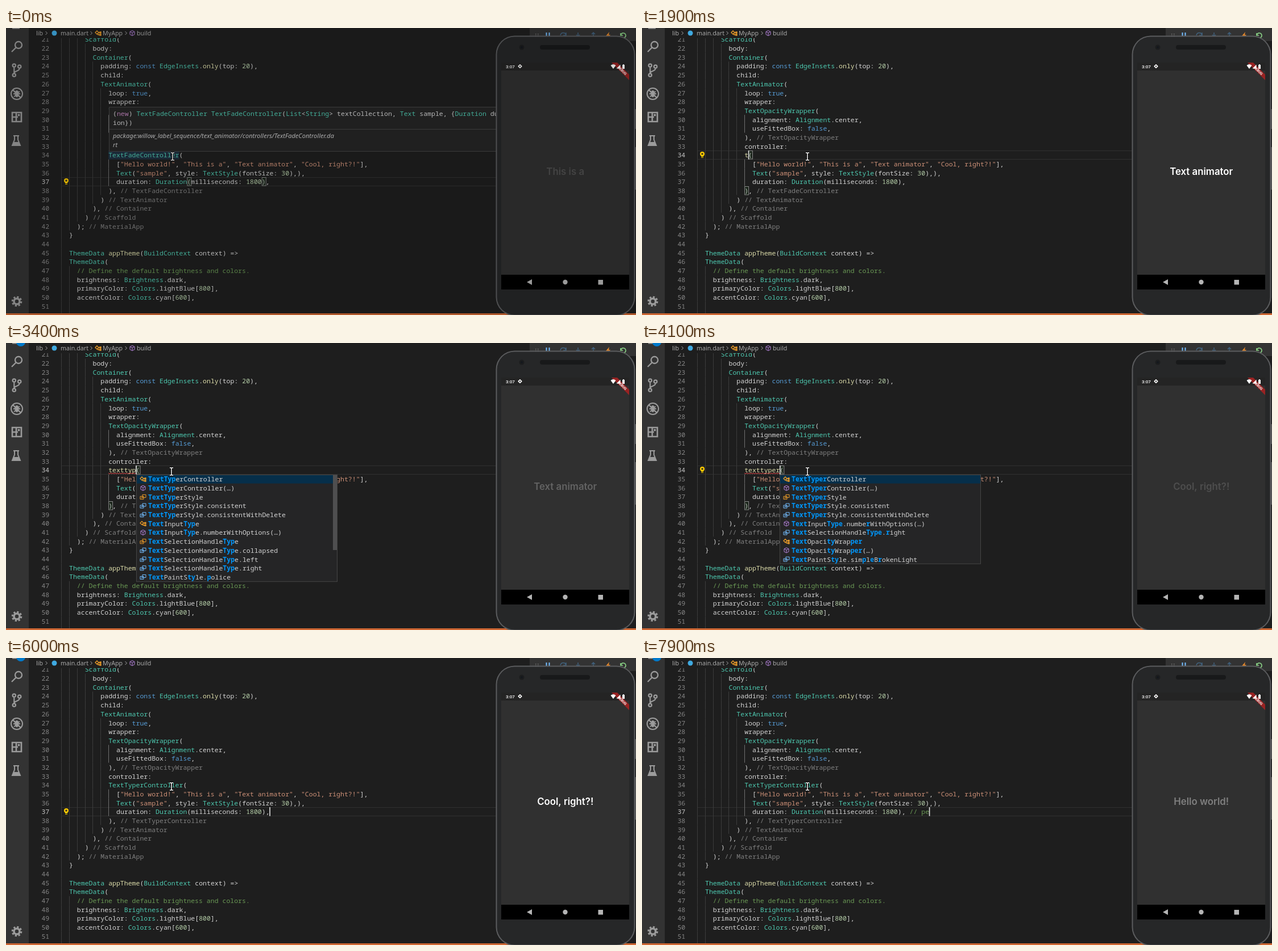
Animation of 1108 by 506 pixels, one loop 8 s. Source, as an HTML page with a canvas:

```html
<!DOCTYPE html>
<html lang="en">
<head>
<meta charset="utf-8">
<title>Code editor beside a phone</title>
<style>
html, body { margin: 0; width: 1108px; height: 506px; overflow: hidden; background: #1e1e1e; }
canvas { display: block; }
</style>
</head>
<body>
<canvas id="stage" width="1108" height="506"></canvas>
<script>
const ctx = document.getElementById('stage').getContext('2d');
const LOOP = 8000, FIRST = 21, ROW = 15.68, X0 = 111, CHAR = 6.914;
const MONO = '11.523px "Noto Sans Mono", monospace';
const UI = '10.7px "Noto Sans", sans-serif';
const GREY = '#9b9b9b', ORANGE = '#ee9d28', PURPLE = '#b180d7', BLUE = '#75beff';

const source = `    Scaffold(
      body:
      Container(
        padding: const EdgeInsets.only(top: 20),
        child:
        TextAnimator(
          loop: true,
          wrapper:
          TextOpacityWrapper(
            alignment: Alignment.center,
            useFittedBox: false,
          ), // TextOpacityWrapper
          controller:
          HEAD(
            ["Hello world!", "This is a", "Text animator", "Cool, right?!"],
            Text("sample", style: TextStyle(fontSize: 30),),
            duration: Duration(milliseconds: 1800),
          ), // LABEL
        ) // TextAnimator
      ), // Container
    ) // Scaffold
  ); // MaterialApp
}

ThemeData appTheme(BuildContext context) =>
ThemeData(
  // Define the default brightness and colors.
  brightness: Brightness.dark,
  primaryColor: Colors.lightBlue[800],
  accentColor: Colors.cyan[600],
  
  // Define the default font family.`.split('\n');

const refreshes = [[300, 300], [500, 700], [900, 900], [1100, 1200], [1400, 1400], [1600, 2500],
  [3400, 3500], [3700, 3800], [4100, 4100], [4400, 4400], [4600, 4800], [5000, 5300], [5500, 6000],
  [6200, 6400], [6600, 6700], [6900, 7000], [7200, 7200], [7400, 7400], [7700, 7900]];
function hold(t) {
  let held = 0;
  for (const [from, to] of refreshes) if (t >= from) held = Math.min(to, Math.floor(t / 100) * 100);
  return held;
}

// Last value whose start time has passed: at(t, 0, a, 500, b, ...)
function at(t, ...steps) {
  let value;
  for (let i = 0; i < steps.length; i += 2) if (t >= steps[i]) value = steps[i + 1];
  return value;
}

const rowY = line => 263 + (line - 37) * ROW;
const colX = col => X0 + col * CHAR;

function rect(x, y, w, h, color) {
  ctx.fillStyle = color;
  ctx.fillRect(x, y, w, h);
}
function frame(x, y, w, h, color) {
  ctx.strokeStyle = color;
  ctx.lineWidth = 1;
  ctx.strokeRect(x, y, w, h);
}
function round(x, y, w, h, r, fill) {
  ctx.beginPath();
  ctx.roundRect(x, y, w, h, r);
  ctx.fillStyle = fill;
  ctx.fill();
}
function dot(x, y, r, color) {
  round(x - r, y - r, 2 * r, 2 * r, r, color);
}
function text(s, x, y, font, color, align = 'left') {
  ctx.font = font;
  ctx.fillStyle = color;
  ctx.textAlign = align;
  ctx.fillText(s, x, y);
}
function icon(x, y, path, color, width = 1, filled) {
  ctx.save();
  ctx.translate(x, y);
  ctx.lineWidth = width;
  ctx.strokeStyle = ctx.fillStyle = color;
  ctx[filled ? 'fill' : 'stroke'](new Path2D(path));
  ctx.restore();
}

const ENUM = 'M-1-4H5V1H-1ZM-5-1H1V4H-5ZM-3.5 1.5h3';
const symbols = {
  C: ['M-5-1L-2-4L1-1L-2 2ZM1-1H4M0 0V3H3M3-2h2v2h-2zM3 2h2v2h-2z', ORANGE, 1.3],
  M: ['M0-4.5L4-2.5V2.5L0 4.5L-4 2.5V-2.5ZM-4-2.5L0-.5L4-2.5M0-.5V4.5', PURPLE],
  E: [ENUM, ORANGE],
  m: [ENUM, BLUE]
};

const tokens = /(\/\/.*)|("[^"]*")|\b(const|true|false)\b|\b(new)\b|(\d+)|([A-Z]\w*)|([a-z]\w*(?=\())|\w+|[^\s\w]/g;
const tokenColors = ['#6a9955', '#ce9178', '#569cd6', '#c586c0', '#b5cea8', '#4ec9b0', '#dcdcaa'];
function code(s, x, y) {
  const closing = /^\s*\)/.test(s);
  for (const m of s.matchAll(tokens)) {
    const kind = m.slice(1).findIndex(Boolean);
    const color = kind < 0 ? '#d4d4d4' : kind === 0 && closing ? '#7f7f7f' : tokenColors[kind];
    text(m[0], x + m.index * CHAR, y, MONO, color);
  }
}

function bracket(line, col) {
  rect(colX(col), rowY(line), CHAR, ROW, 'rgba(0,100,0,.1)');
  frame(colX(col) + .5, Math.round(rowY(line)) + .5, CHAR, 14.5, '#888');
}

function bulb(line) {
  const y = rowY(line) + 6;
  dot(106, y, 4, '#fc0');
  rect(104, y + 3, 4, 4, '#fc0');
  dot(106, y, 1.8, '#3a3518');
  rect(104, y + 5, 4, 1, '#1e1e1e');
}

function squiggle(x, y, w) {
  ctx.beginPath();
  for (let i = 0; i <= w; i += 2) ctx.lineTo(x + i, y + (i % 4 ? 1 : -1));
  ctx.strokeStyle = '#f14c4c';
  ctx.lineWidth = 1;
  ctx.stroke();
}

function editor(t, s) {
  const lines = source.map(l => l.replace('HEAD', s.head).replace('LABEL', s.label));
  lines[16] += s.tail;
  const y = Math.round(rowY(s.line));
  if (!s.selected) {
    rect(98, y, 770, 1, '#303030');
    rect(98, y + 15, 770, 1, '#303030');
  }
  lines.forEach((line, i) => {
    const n = FIRST + i, indent = line.search(/\S|$/);
    for (let col = -2; col < (line ? indent : 0); col += 2)
      rect(Math.round(colX(col)), rowY(n), 1, ROW, col === 10 ? '#707070' : '#3c3c3c');
    text(n < 52 ? n : '', 76.2, rowY(n) + 12.3, MONO, n === s.line ? '#c6c6c6' : '#858585', 'right');
  });
  if (s.selected) rect(colX(10), rowY(34), 18 * CHAR, ROW, '#2a5a88');
  if (s.hover) rect(colX(10), rowY(34), s.head.length * CHAR, ROW, '#203040');
  lines.forEach((line, i) => code(line, X0, rowY(FIRST + i) + 12.3));
  if (t < 500) { bracket(37, 30); bracket(37, 49); }
  if (t >= 1700 && t < 5300) { bracket(34, 10 + s.head.length); bracket(38, 10); }
  if (t >= 3400 && t < 4600) squiggle(colX(10), 230, s.head.length * CHAR);
  if (s.caret) rect(colX(s.col) - .3, rowY(s.line), 1.6, ROW, '#e0e0e0');
  if (s.bulb) bulb(s.bulb);
}

// Hover card whose bottom edge rests on line 34.
function hoverCard(lines, path) {
  const h = 46.6 + lines.length * ROW, y = 217 - h;
  rect(181, y, 700, h, '#252526');
  frame(181.5, Math.round(y) + .5, 700, h, '#454545');
  lines.forEach((l, i) => code(l, 188, y + 16 + i * ROW));
  rect(182, 178, 700, 1, '#454545');
  const font = 'italic ' + UI.replace('10.7', '11');
  text(path, 188, 194, font, '#ccc');
  text('rt', 188, 209.7, font, '#ccc');
}

const lists = {
  tex: ['C *Tex*t', 'M *Tex*t(…)', 'C *Tex*tStyle', 'M *Tex*tStyle(…)', 'E *Tex*tAlign', 'm *Tex*tAlign.center',
    'm *Tex*tAlign.left', 'm *Tex*tAlign.right', 'C *Tex*tAnimator', 'M *Tex*tAnimator(…)', 'C *Tex*tField', 'M *Tex*tField(…)'],
  texttyp: ['C *TextTyp*erController', 'M *TextTyp*erController(…)', 'E *TextTyp*erStyle',
    'm *TextTyp*erStyle.consistent', 'm *TextTyp*erStyle.consistentWithDelete', 'C *Text*Input*Typ*e',
    'M *Text*Input*Typ*e.numberWithOptions(…)', 'E *Text*SelectionHandle*Typ*e',
    'm *Text*SelectionHandle*Typ*e.collapsed', 'm *Text*SelectionHandle*Typ*e.left',
    'm *Text*SelectionHandle*Typ*e.right', 'm *Text*PaintS*ty*le.*p*olice'],
  texttyper: ['C *TextTyper*Controller', 'M *TextTyper*Controller(…)', 'E *TextTyper*Style',
    'm *TextTyper*Style.consistent', 'm *TextTyper*Style.consistentWithDelete',
    'M *Text*Input*Type*.numbe*r*WithOptions(…)', 'm *Text*SelectionHandle*Type*.*r*ight',
    'C *Text*Opaci*ty*Wrap*per*', 'M *Text*Opaci*ty*Wrap*per*(…)', 'm *Text*PaintS*ty*le.sim*p*l*e*B*r*okenLight']
};

function suggestions(key) {
  const items = lists[key], x = Math.round(colX(10 + key.length)) + 1, y = 232;
  const h = items.length * ROW;
  rect(x, y, 353, h, '#252526');
  rect(x, y, 353, ROW, '#062f4a');
  items.forEach((item, i) => {
    const mid = y + 8 + i * ROW;
    icon(x + 11, mid, ...symbols[item[0]]);
    let pen = x + 20;
    item.slice(2).split('*').forEach((part, j) => {
      text(part, pen, mid + 4.4, (j % 2 ? 'bold ' : '') + MONO, j % 2 ? '#0097fb' : '#d4d4d4');
      pen += part.length * CHAR;
    });
  });
  if (items.length > 10) rect(x + 345, y + 1, 8, 132, '#4f4f50');
  frame(x - .5, y + .5, 353, h, '#454545');
}

function breadcrumbs() {
  rect(40, 0, 1068, 18, '#1e1e1e');
  for (const [label, x] of [['lib', 53], ['main.dart', 96], ['MyApp', 170], ['build', 230]])
    text(label, x, 12.8, UI, '#a9a9a9');
  for (const x of [71, 150, 211]) icon(x, 9, 'M-1.5-3L1.5 0L-1.5 3', '#a9a9a9');
  dot(85, 9, 4.5, '#3fa9e0');
  icon(162, 9, ...symbols.C);
  icon(222, 9, ...symbols.M);
}

function activityBar(badge) {
  rect(0, 0, 40, 506, '#333');
  rect(11, 0, 13, 1.5, GREY);
  if (badge) dot(26, -2, 8, '#007acc');
  icon(22, 30, 'M6 0A6 6 0 1 1-6 0A6 6 0 1 1 6 0M-4 4L-12 12', GREY, 2.3);
  icon(19, 74, 'M-2-8A2.7 2.7 0 1 1-7.4-8A2.7 2.7 0 1 1-2-8M7.4-6A2.7 2.7 0 1 1 2-6A2.7 2.7 0 1 1 7.4-6' +
    'M-2 9A2.7 2.7 0 1 1-7.4 9A2.7 2.7 0 1 1-2 9M-4.7-5V6M4.7-3C4.7 3-4.7 1-4.7 6', GREY, 2.2);
  icon(19, 116, 'M10 0A10 10 0 1 1-10 0A10 10 0 1 1 10 0M-7-7L7 7M-6 0H6M-5-4L-2-2M5-4L2-2M-5 5L-2 3M5 5L2 3', GREY, 2);
  icon(19, 116, 'M0-6C5-6 4 6 0 6C-4 6-5-6 0-6', GREY, 1, true);
  icon(19, 157, 'M-8-8H8V8H-8ZM-8 0H2M-1-8V8M3-4h1v1h-1z', GREY, 2.6);
  icon(18, 199, 'M-5-9H5M-3-9V-2L-7 8H7L3-2V-9', GREY, 2);
  icon(18, 199, 'M-4 2H4L7 8H-7Z', GREY, 1, true);
  const ring = r => `M${r} 0A${r} ${r} 0 1 1-${r} 0A${r} ${r} 0 1 1 ${r} 0`;
  icon(19, 482, ring(5), GREY, 3.6);
  ctx.setLineDash([3.2, 2.92]);
  icon(19, 482, ring(7.8), GREY, 3);
  ctx.setLineDash([]);
}

function debugBar() {
  rect(921, 0, 187, 23, '#333');
  for (let i = 0; i < 6; i++) rect(931 + i % 2 * 4, 10 + (i >> 1) * 3, 1.5, 1.5, '#777');
  icon(953, 13, 'M-2.5-5V5M2.5-5V5', BLUE, 2);
  icon(980, 13, 'M-5 0C-4-6 4-6 5 0M5-5V0H0', '#40627f', 1.5);
  icon(1006, 13, 'M0-5V2M-3-1L0 2L3-1', '#40627f', 1.5);
  icon(1033, 13, 'M0 2V-5M-3-2L0-5L3-2', '#40627f', 1.5);
  icon(1059, 13, 'M2-6L-4 1H-1L-2 6L4-1H1Z', '#e8892b', 1, true);
  icon(1085, 13, 'M-4-4V0H0M-4 0C-2-6 5-5 5 1C4 4 2 5 0 5', '#89d185', 1.7);
}

const messages = ['This is a', 'Text animator', 'Cool, right?!', 'Hello world!'];
function phone(t) {
  rect(1104, 143, 4, 35, '#555');
  rect(1104, 210, 4, 75, '#555');
  round(861.5, 13.5, 245, 494, 33, '#5b5c5e');
  round(863.5, 15.5, 241, 490, 31, '#262728');
  round(939, 30, 88, 8, 4, '#18191a');
  dot(907, 34, 4.5, '#1c1d1e');
  dot(907, 34, 2, '#15181e');

  rect(871, 61, 225, 400, '#303030');
  rect(871, 61, 225, 14, '#242424');
  icon(1096, 61, 'M-31 0H-21L0 21V31Z', '#982323', 1, true);
  ctx.save();
  ctx.translate(1084, 75);
  ctx.rotate(Math.PI / 4);
  text('DEBUG', 0, 2.4, 'bold 6px Roboto, sans-serif', '#fff', 'center');
  ctx.restore();
  text('3:07', 879, 71, '500 8px Roboto, sans-serif', '#fff');
  icon(904, 67.5, 'M2 0A2 2 0 1 1-2 0A2 2 0 1 1 2 0M-3.5 0H-2M2 0H3.5M0-3.5V-2M0 2V3.5', '#fff', 1.6);
  icon(1068, 68, 'M-4.5-2Q0-6 4.5-2L0 4Z', '#fff', 1, true);
  icon(1077, 68, 'M-3.5 3.5L3.5-3.5V3.5Z', '#fff', 1, true);
  icon(1086, 68, 'M-2-3H-1V-4H1V-3H2V4H-2Z', '#fff', 1, true);

  const cycle = Math.floor((t - 420) / 3500), age = t - 420 - cycle * 3500;
  ctx.globalAlpha = Math.max(0, Math.min(1, age / 1250, (3250 - age) / 1100));
  text(messages[cycle + 1], 983.7, 259, '600 16.8px Inter, sans-serif', '#fff', 'center');
  ctx.globalAlpha = 1;

  rect(871, 435, 225, 26, '#000');
  icon(921, 448, 'M-5 0L4-5V5Z', '#b5b5b5', 1, true);
  dot(983.5, 448, 4.2, '#b5b5b5');
  rect(1041.5, 444, 8.5, 8.5, '#b5b5b5');
}

function pointer(x, y) {
  const beam = 'M-3-6.5H-1L0-5.5L1-6.5H3M0-5.5V5.5M-3 6.5H-1L0 5.5L1 6.5H3';
  icon(x, y, beam, '#000', 3.4);
  icon(x, y, beam, '#fff', 1.5);
}

function stateAt(t) {
  const head = at(t, 0, 'TextFadeController', 1700, 't', 2000, 'te', 2200, 'tex', 3400, 'texttyp',
    3500, 'texttype', 3700, 'texttyper', 4400, 'TextTyperController');
  const tail = at(t, 0, '', 6600, ' ', 6900, ' /', 7000, ' //', 7200, ' // ', 7700, ' // p', 7900, ' // pe');
  return {
    head, tail,
    label: at(t, 0, 'TextFadeController', 4700, 'TextTyperController'),
    line: at(t, 0, 37, 500, 34, 5300, 35, 5500, 36, 5700, 37),
    col: at(t, 0, 10 + head.length, 5800, 51 + tail.length),
    caret: at(t, 0, false, 500, true, 1200, false, 1600, true),
    bulb: at(t, 0, 37, 900, 34, 3400, 0, 4100, 34, 4600, 0, 4800, 34, 5500, 0, 5800, 37, 6600, 0, 7200, 37, 7400, 0),
    popup: at(t, 0, '', 2500, 'tex', 3400, 'texttyp', 3800, 'texttyper', 4400, ''),
    hover: at(t, 0, true, 500, false, 5000, true, 5300, false),
    selected: t >= 500 && t < 1700,
    shade: at(t, 0, .15, 500, .1, 600, .05, 700, 0)
  };
}

function draw(now) {
  const t = hold(now % LOOP), s = stateAt(t);
  rect(0, 0, 1108, 506, '#1e1e1e');
  editor(t, s);
  if (s.hover) {
    const sign = `(new) ${s.head} ${s.head}(List<String> textCollection, Text sample, {Duration d`;
    const lines = t < 500 ? [sign + 'urat', 'ion})']
      : [sign, 'uration, TextTyperStyle style})', '', 'Types each text letter by letter.'];
    hoverCard(lines, `package:willow_label_sequence/text_animator/controllers/${s.head}.da`);
  }
  if (s.popup) suggestions(s.popup);
  breadcrumbs();
  activityBar(t >= 2100);
  rect(0, 503, 1108, 3, '#cc6633');
  debugBar();
  phone(t);
  pointer(at(t, 0, 293, 300, 285, 500, 291), 226.5);
  if (s.shade) rect(0, 0, 1108, 506, `rgba(0,0,0,${s.shade})`);
  requestAnimationFrame(tick);
}
function tick() { draw(performance.now()); }
tick();
</script>
</body>
</html>
```
